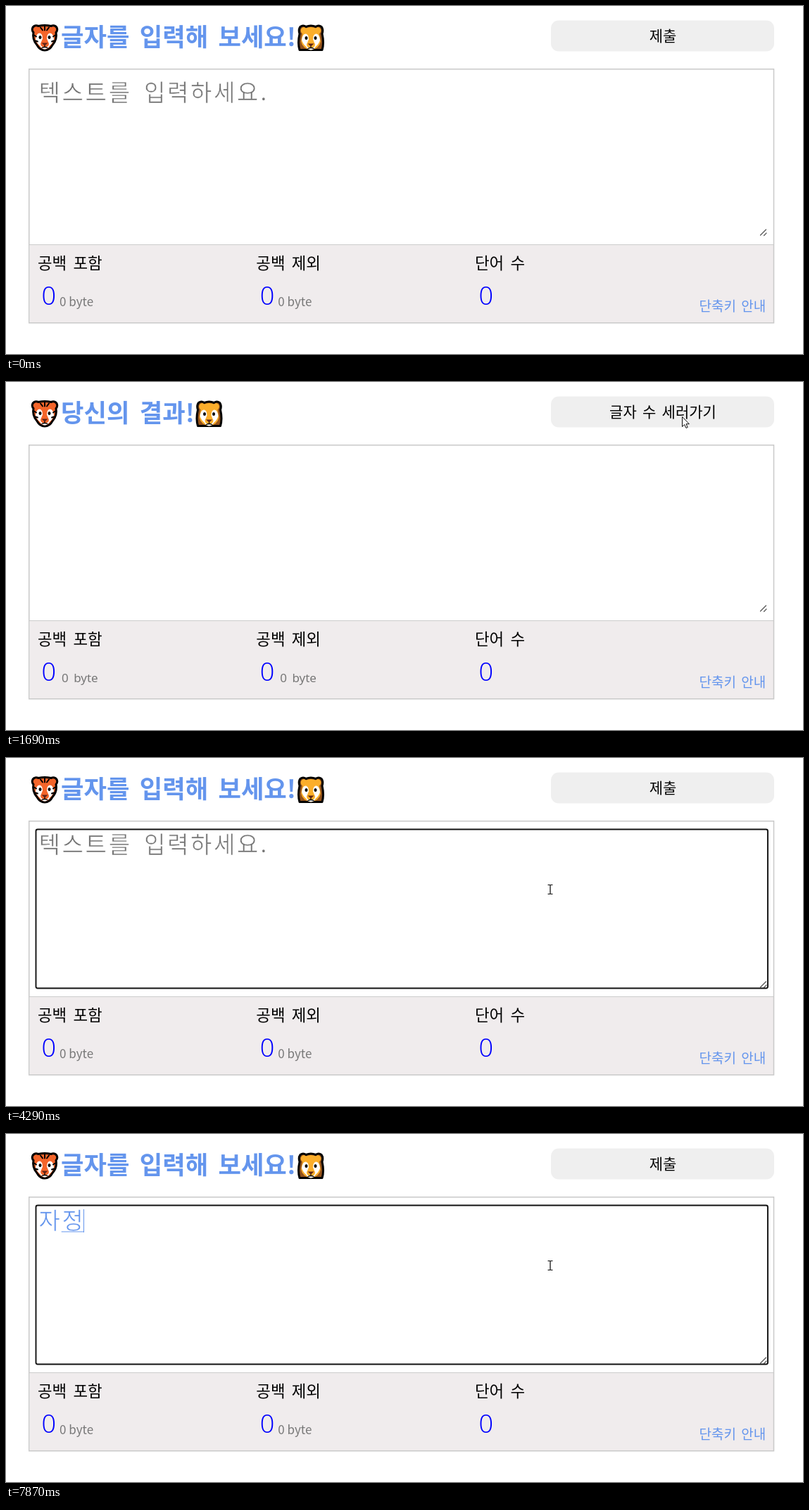
These frames come from a looping animation (1132x495 px, 8000 ms). An HTML page:

```html
<!DOCTYPE html>
<html lang="ko">
<head>
<meta charset="utf-8">
<title>글자 수 세기</title>
<style>
  html, body { margin: 0; width: 100%; height: 100%; overflow: hidden; background: #fff; }
  svg { display: block; width: 1132px; height: 495px; }
  text { font-family: "Noto Sans CJK KR", "Noto Sans CJK", "Noto Sans KR", sans-serif; }
  .title { font-size: 35.3px; font-weight: 700; fill: cornflowerblue; word-spacing: 4.4px; }
  .button { font-size: 21px; text-anchor: middle; word-spacing: 2.4px; }
  .label { font-size: 22.4px; word-spacing: 3px; }
  .count { font: 300 36px "Open Sans", "Noto Sans", sans-serif; fill: #00f; }
  .byte { font-size: 17px; fill: #777; word-spacing: -1px; }
  .byte.wide { font: 17px "Noto Sans", sans-serif; word-spacing: 3px; }
  .link { font-size: 19px; fill: cornflowerblue; word-spacing: 2px; }
  /* the white stroke thins the letters */
  .input { font-size: 33px; font-weight: 300; letter-spacing: 2.7px; word-spacing: 5.2px; stroke: #fff; stroke-width: .7px; }
  .hint { fill: #757575; }
  .typed { fill: cornflowerblue; }
  .line { fill: none; stroke: #000; stroke-linecap: round; }
</style>
</head>
<body>
<svg viewBox="0 0 1132 495">
  <defs>
    <g id="face">
      <path d="M7 22Q8 13 13 13Q17 14 17 21L14 28Q14 33 20 33Q26 33 26 28L23 21Q23 14 27 13Q32 13 33 22Q31 28 27 31Q24 36 20 36Q16 36 13 31Q9 28 7 22Z" fill="#fff"/>
      <ellipse cx="13.500" cy="19" rx="2" ry="2.600"/>
      <ellipse cx="26.500" cy="19" rx="2" ry="2.600"/>
      <path d="M15.500 27H24.500L20 31Z" fill="#5d2318"/>
      <path class="line" stroke-width="1.300" d="M20 31V33M16 34Q20 32 24 34"/>
    </g>
  </defs>
  <g transform="translate(35 25.5)">
    <path d="M3 5Q6 1 11 3Q20 1 29 3Q34 1 37 5Q39 9 36 12Q38 22 31 30Q27 37.500 20 37.500Q13 37.500 9 30Q2 22 4 12Q1 9 3 5Z" fill="#f4652a" stroke="#000" stroke-width="3" stroke-linejoin="round"/>
    <use href="#face"/>
    <path class="line" stroke-width="2" d="M20 4V9M14 5L17 9M26 5L23 9M5 16L8 18M35 16L32 18M7 24L10 25M33 24L30 25"/>
  </g>
  <g id="lion">
    <path d="M5 3Q9 0 13 3Q20 0 27 3Q31 0 35 3Q38 7 36 13Q39 26 36 36H4Q1 26 4 13Q2 7 5 3Z" fill="#94521a" stroke="#000" stroke-width="3" stroke-linejoin="round"/>
    <path d="M7 5Q10 2 13 5Q20 2 27 5Q30 2 33 5Q36 9 32 13L34 24Q32 34 20 36Q8 34 6 24L8 13Q4 9 7 5Z" fill="#fbae2b"/>
    <use href="#face"/>
  </g>
  <text id="title" class="title" x="78" y="57"></text>

  <rect x="774" y="20.500" width="317" height="44" rx="11" fill="#efefef"/>
  <text id="button" class="button" x="933" y="50"></text>

  <rect x="34" y="339" width="1056" height="112" fill="#f0eced"/>
  <path d="M33 339.500H1090" stroke="#ccc"/>
  <rect x="32.750" y="89.750" width="1057.750" height="361" fill="none" stroke="#c9c9c9" stroke-width="1.500"/>
  <path class="line" stroke-width="1.200" style="stroke:#555" d="M1071.500 326L1079.500 318M1076.500 326.500L1080 323"/>
  <g id="stats"></g>
  <text class="link" x="984.500" y="434">단축키 안내</text>

  <rect id="focus" x="42.500" y="101.500" width="1039.500" height="226" rx="2.500" fill="none" stroke="#111" stroke-width="1.900"/>
  <text id="hint" class="input hint" x="46.500" y="135">텍스트를 입력하세요.</text>
  <text id="typed" class="input typed" x="46.500" y="135"></text>
  <rect id="underline" y="138.500" width="32" height="1" fill="cornflowerblue"/>
  <rect id="caret" y="107" width="1" height="33" fill="cornflowerblue"/>

  <path id="arrow" d="M.5.500V14.500L3.700 11.500L6 16.500L8.200 15.500L6 10.700H10.300Z" fill="#fff" stroke="#111"/>
  <path id="beam" class="line" stroke-width="1.200" d="M-3-6.500H-1L0-6L1-6.500H3M0-6V6M-3 6.500H-1L0 6L1 6.500H3"/>
</svg>
<script>
const LOOP = 8000, CELL = 32.7, LEFT = 46;
const el = id => document.getElementById(id);
const show = (id, on) => el(id).setAttribute('visibility', on ? 'visible' : 'hidden');
const set = (id, name, value) => el(id).setAttribute(name, value);
const between = (t, a, b) => t >= a && t < b;

el('stats').innerHTML = [['공백 포함', 45], ['공백 제외', 355.3], ['단어 수', 666]].map(([name, x], i) =>
  `<text class="label" x="${x}" y="373.500">${name}</text>
   <text class="count" x="${x + 5.5}" y="425">0</text>` +
  (i < 2 ? `<text class="byte" data-x="${x + 31}" y="426.500">0 byte</text>` : '')).join('');
const bytes = document.querySelectorAll('.byte');

// time, x, y of the pointer hot spot
const path = [
  [590, 902, 307], [800, 946, 222], [1010, 979, 132], [1150, 966, 82], [1220, 958, 67],
  [1353, 958, 67], [1550, 960, 49], [2880, 960, 49], [2950, 960, 48], [3293, 960, 48],
  [3500, 895, 92], [3700, 800, 165], [3830, 772, 187], [4160, 773, 187]
];

// time, finished text, text being composed
const typing = [
  [0, '', ''], [4690, '', 'ㅈ'], [4820, '', '자'], [5150, '', '재'], [5350, '', ''],
  [5610, '', 'ㅍ'], [5670, '', ''], [6000, '', 'ㅍ'], [6130, '', ''],
  [7590, '', 'ㅈ'], [7680, '', '자'], [7790, '자', '저'], [7870, '자', '정']
];

// spans in which the caret shows in the empty field
const blinks = [[3760, 4290], [5670, 6000], [6130, 6660], [7190, 7590]];

function pointerAt(t) {
  const i = path.findIndex(p => p[0] > t);
  if (i < 1) return path.at(i).slice(1);
  const [a, b] = [path[i - 1], path[i]];
  const k = (t - a[0]) / (b[0] - a[0]);
  return [1, 2].map(n => Math.round(a[n] + (b[n] - a[n]) * k));
}

function drawPage(result) {
  el('title').textContent = result ? '당신의 결과!' : '글자를 입력해 보세요!';
  el('button').textContent = result ? '글자 수 세러가기' : '제출';
  set('lion', 'transform', `translate(${result ? 268.5 : 413} 26.5)`);
  bytes.forEach(b => {
    b.classList.toggle('wide', result);
    b.setAttribute('x', +b.dataset.x + (result ? 3 : 0));
  });
}

function drawInput(t, result) {
  const [, done, draft] = typing.findLast(s => s[0] <= t);
  const text = done + draft;
  show('focus', t >= 3760);
  show('hint', !result && !text);
  el('typed').textContent = text;
  show('underline', draft);
  set('underline', 'x', LEFT + done.length * CELL);
  show('caret', text || blinks.some(([a, b]) => between(t, a, b)));
  set('caret', 'x', Math.round(LEFT - 1 + text.length * CELL));
}

function drawPointer(t) {
  const [x, y] = pointerAt(t);
  const visible = t >= path[0][0], inField = y > 101 && y < 328;
  show('arrow', visible && !inField);
  show('beam', visible && inField);
  for (const id of ['arrow', 'beam']) set(id, 'transform', `translate(${x} ${y})`);
}

const start = performance.now();
let page = null;
function frame() {
  const t = (performance.now() - start) % LOOP;
  const result = between(t, 1620, 2950);
  if (result !== page) drawPage(page = result);
  drawInput(t, result);
  drawPointer(t);
  requestAnimationFrame(frame);
}
frame();
</script>
</body>
</html>
```
